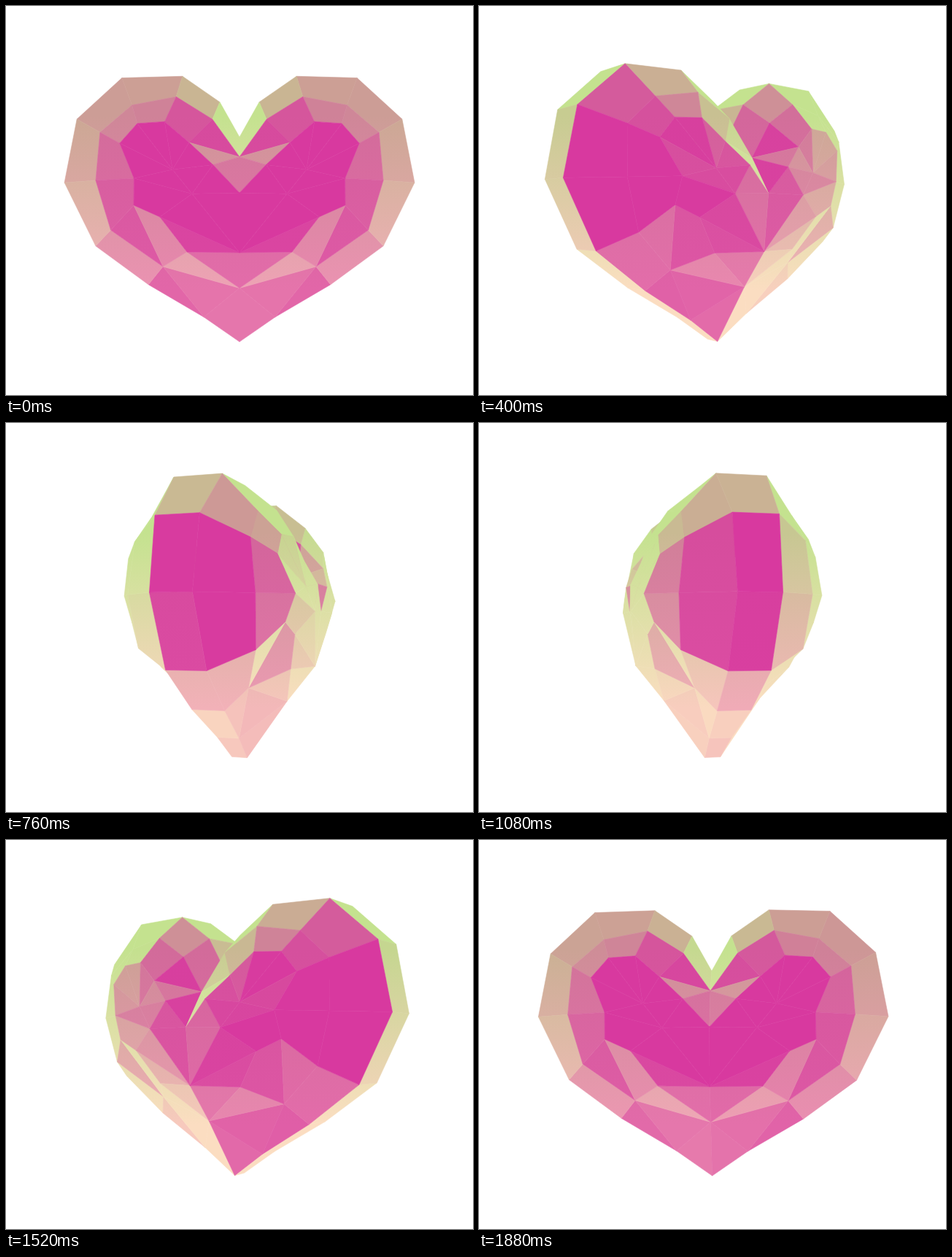
An HTML page with a canvas for the animation above (1.92 s loop, 640 by 533 pixels).

```html
<!DOCTYPE html>
<html lang="en">
<head>
<meta charset="utf-8">
<title>Heart gem</title>
<style>
  html, body { margin: 0; width: 100%; height: 100%; overflow: hidden; background: #fff; }
  canvas { display: block; }
</style>
</head>
<body>
<canvas id="stage" width="640" height="533"></canvas>
<script>
const ctx = document.getElementById('stage').getContext('2d');
const W = 640, H = 533, CX = 320, CY = 280, DIST = 945;
const STEP = 40, STEPS = 48, TURN = Math.PI / 47.5;
const TOP = [196, 226, 143], BOTTOM = [251, 221, 193], PINK = [216, 57, 159];

// One quarter of the gem (x, y up, z); the rest is mirrored.
const rim = [
  [0, 97, 32], [26, 143, 34], [75.5, 177.5, 32], [156, 175.7, 30], [216.7, 121.6, 26],
  [233.7, 37, 24.5], [192, -47.6, 24.5], [122, -99.5, 21], [48, -144, 15], [0, -178, 11]
];
const band = [
  [0, 67, 82], [34, 114.5, 78], [80, 143.5, 74], [137, 134, 67], [177, 99, 70],
  [181, 37.7, 77], [163, -25, 72], [100, -73.5, 44]
];
const crown = [
  [61.5, 82.7, 104], [92, 109, 98], [126.5, 107.5, 92], [148, 83, 93], [128, 39, 109],
  [130, 6.3, 97.5], [97.5, -8, 101], [65.3, -51.7, 88],
  [0, -99, 67], [0, -51.5, 105], [0, 21.2, 113],
  [57, 20, 117], [81, 49.5, 111], [32, 55, 115]
];
const points = [...rim, ...band, ...crown];
const names = 'abcdefghijklmnopqrstuvwxyzABCDEF';
const facets = ('ablk bcml cdnm deon efpo fgqp ghrq kls lmts mnut novu opwv pqxw qrx ' +
  'xyzr rzA rAi hri iAj zBA yzB yBD wxyD CBD uEv vEw wED tuE stE sFE FDE FCD ksF kFC').split(' ');

const sub = (a, b) => a.map((v, i) => v - b[i]);
const dot = (a, b) => a[0] * b[0] + a[1] * b[1] + a[2] * b[2];
const cross = (a, b) => [
  a[1] * b[2] - a[2] * b[1],
  a[2] * b[0] - a[0] * b[2],
  a[0] * b[1] - a[1] * b[0]
];
const unit = a => a.map(v => v / Math.hypot(...a));
const flip = (p, sx, sz) => [p[0] * sx, p[1], p[2] * sz];
const center = pts => [0, 1, 2].map(i => pts.reduce((sum, p) => sum + p[i], 0) / pts.length);

function buildFaces() {
  const faces = [];
  const add = (pts, n) => faces.push({ pts, n: unit(n), mid: center(pts) });
  for (const sx of [1, -1]) {
    for (const sz of [1, -1]) {
      for (const f of facets) {
        const pts = [...f].map(c => flip(points[names.indexOf(c)], sx, sz));
        let n = cross(sub(pts[2], pts[0]), sub(pts[pts.length - 1], pts[1]));
        if (n[2] * sz < 0) n = n.map(v => -v);
        add(pts, n);
      }
    }
    // flat strip around the side
    for (let i = 0; i < rim.length - 1; i++) {
      const p = rim[i], q = rim[i + 1];
      add([flip(p, sx, 1), flip(q, sx, 1), flip(q, sx, -1), flip(p, sx, -1)],
          [(p[1] - q[1]) * sx, q[0] - p[0], 0]);
    }
  }
  return faces;
}
const faces = buildFaces();

const tint = (c, k) => `rgb(${c.map((v, i) => Math.round(v + (PINK[i] - v) * k))})`;

function shade(k) {
  const g = ctx.createLinearGradient(0, 150, 0, 390);
  g.addColorStop(0, tint(TOP, k));
  g.addColorStop(1, tint(BOTTOM, k));
  return g;
}

function draw(angle) {
  const c = Math.cos(angle), s = Math.sin(angle);
  const spin = p => [p[0] * c + p[2] * s, p[1], p[2] * c - p[0] * s];
  ctx.fillStyle = '#fff';
  ctx.fillRect(0, 0, W, H);
  const seen = [];
  for (const f of faces) {
    const view = sub([0, 0, DIST], spin(f.mid));
    const facing = dot(spin(f.n), unit(view));
    if (facing > 0) seen.push({ f, facing, far: Math.hypot(...view) });
  }
  seen.sort((a, b) => b.far - a.far);
  ctx.lineWidth = 0.6;
  ctx.lineJoin = 'round';
  for (const { f, facing } of seen) {
    ctx.beginPath();
    for (const p of f.pts) {
      const [x, y, z] = spin(p), m = DIST / (DIST - z);
      ctx.lineTo(CX + x * m, CY - y * m);
    }
    ctx.closePath();
    const k = Math.min(1, Math.max(0, (facing - 0.33) / 0.55));
    ctx.fillStyle = ctx.strokeStyle = shade(k);
    ctx.fill();
    ctx.stroke();
  }
}

const start = performance.now();
function tick() {
  const n = Math.floor((performance.now() - start) / STEP) % STEPS;
  draw(n * TURN);
  requestAnimationFrame(tick);
}
tick();
</script>
</body>
</html>
```
